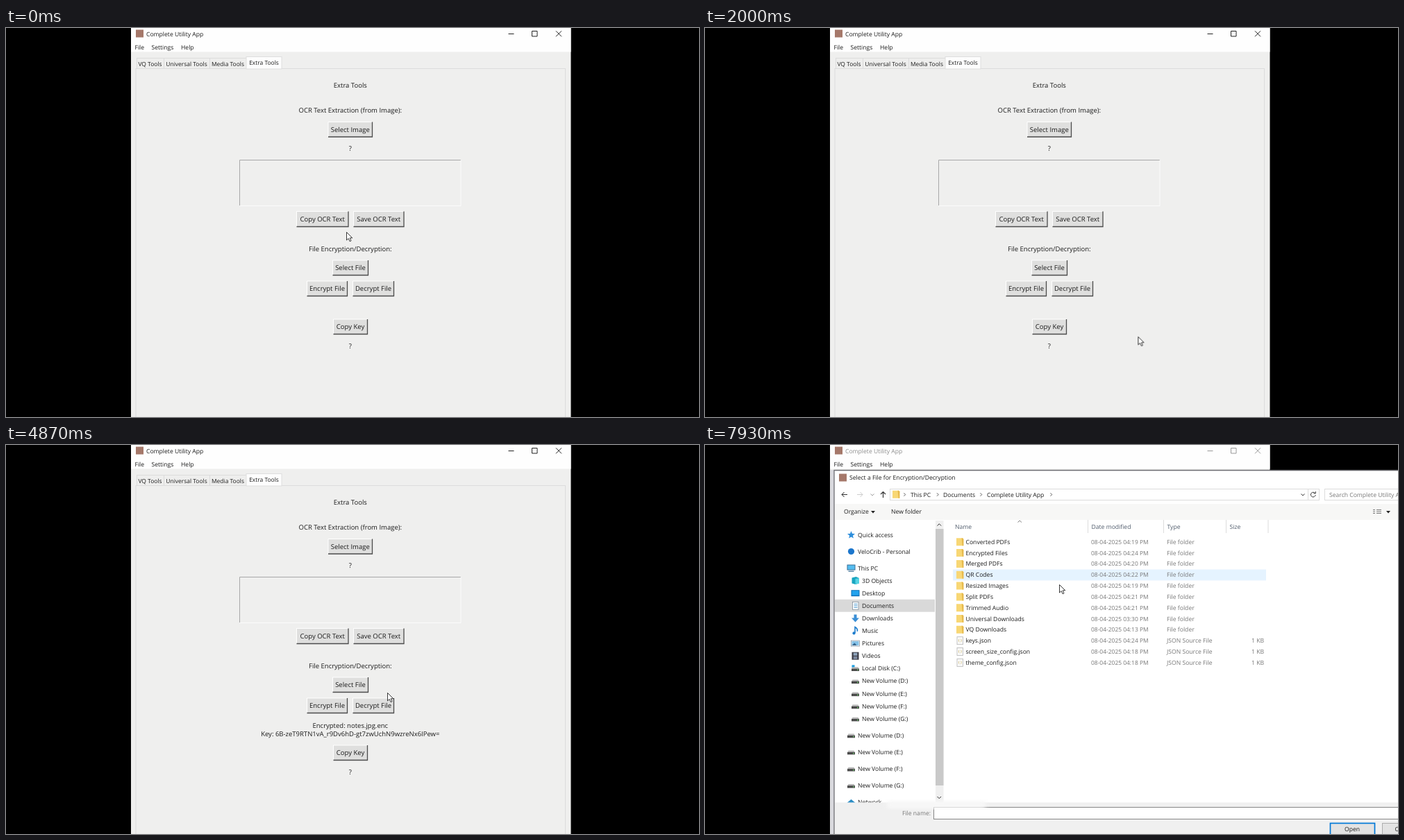
An HTML page for the animation above (8000 ms loop, 998x561 px).

```html
<!DOCTYPE html>
<html lang="en">
<head>
<meta charset="utf-8">
<title>Complete Utility App</title>
<style>
html, body { margin: 0; width: 100%; height: 100%; overflow: hidden; background: #000; }
svg { display: block; width: 100%; height: 100%; }
text { font: 8.6px "Open Sans", "Noto Sans", sans-serif; fill: #1c1c1c; text-rendering: geometricPrecision; white-space: pre; }
.tk { font-size: 9.5px; }
.mid { text-anchor: middle; }
.end { text-anchor: end; }
.tab { font-size: 8.45px; }
.dim { fill: #777; }
.head { fill: #4f5b6b; }
.date { font-size: 8.45px; fill: #777; }
.line { fill: none; stroke: #333; }
.thin { fill: none; stroke: #dcdcdc; }
#dialog { transform-origin: 585px 300px; }
</style>
</head>
<body>
<svg id="stage" viewBox="0 0 998 561" preserveAspectRatio="none"></svg>
<script>
const LOOP = 8000, OPEN_1 = 560, CLOSE_1 = 1640, OPEN_2 = 5930, DOCS = 6500, APP = 7580;
const PICKED = [1000, 5800];

// ---- drawing helpers ----
const rect = (x, y, w, h, fill, extra = '') => `<rect x="${x}" y="${y}" width="${w}" height="${h}" fill="${fill}" ${extra}/>`;
const path = (d, extra = 'class="line"') => `<path d="${d}" ${extra}/>`;
const text = (x, y, s, cls = '') => `<text x="${x}" y="${y}" class="${cls}">${s}</text>`;
const group = (id, ...parts) => `<g id="${id}">${parts.join('')}</g>`;
const at = (x, y, body) => `<g transform="translate(${x} ${y})">${body}</g>`;
const chevron = (x, y, color = '#555') => path(`M${x - 1} ${y - 2.2}l2.2 2.2l-2.2 2.2`, `fill="none" stroke="${color}"`);
const chevronDown = (x, y, color = '#555') => path(`M${x - 2.5} ${y - 1}l2.5 2.4l2.5 -2.4`, `fill="none" stroke="${color}"`);
const triangle = (x, y) => path(`M${x - 3} ${y - 1.5}h6l-3 3.4z`, 'fill="#222"');
const appMark = (x, y) => rect(x, y, 11, 11, '#a5786a');

const button = (x, y, w, h, label) => rect(x, y, w, h, '#dfdfde') +
  path(`M${x} ${y + h}V${y}H${x + w}`, 'fill="none" stroke="#fff"') +
  path(`M${x} ${y + h}H${x + w}V${y}`, 'fill="none" stroke="#4c4c4c" stroke-width="1.3"') +
  text(x + w / 2, y + h / 2 + 3.4, label, 'tk mid');

const icons = {
  star: path('M0 -5.5L1.5 -1.7L5.5 -1.4L2.4 1.2L3.4 5L0 2.9L-3.4 5L-2.4 1.2L-5.5 -1.4L-1.5 -1.7Z', 'fill="#2f8fdc"'),
  dot: '<circle r="4.6" fill="#1b76cc"/>',
  pc: rect(-6, -5, 12, 8, '#3a6f96') + rect(-5, -4, 10, 6, '#55bdf0') + rect(-4, 4, 8, 1.3, '#4a7a9c'),
  cube: path('M-5 -4L1 -5.5L5.5 -3.5V4L0 5.5L-5 4Z', 'fill="#19a5c0"') + path('M0 -2.5L5.5 -3.5V4L0 5.5Z', 'fill="#55d3e3"'),
  desktop: rect(-6, -4.5, 12, 9, '#0b6fb8') + rect(-5, -3.5, 10, 6.5, '#22a3ee'),
  doc: rect(-4, -5.5, 8.5, 11, '#fff', 'stroke="#7f8d99" stroke-width=".8"') + path('M-2 -2.5h5M-2 0h5M-2 2.5h5', 'stroke="#4d9bd0"'),
  down: path('M-2 -5.5H2V-.5H5.5L0 5.5L-5.5 -.5H-2Z', 'fill="#3b8fd6"'),
  music: path('M-.5 3V-5.5Q4 -3 2.6 .8', 'fill="none" stroke="#1d7ccc" stroke-width="1.6"') + '<circle cx="-2" cy="3.4" r="2.1" fill="#1d7ccc"/>',
  picture: rect(-6, -4, 12, 8, '#fff', 'stroke="#8a98a5" stroke-width=".8"') + rect(-5, -3, 10, 6, '#83c1e8') + path('M-5 3L-1 -.5L2 3Z', 'fill="#36648b"'),
  video: rect(-5, -5.5, 10, 11, '#3b3b44') + rect(-2.8, -4.5, 5.6, 4, '#8fa5bd') + rect(-2.8, .6, 5.6, 4, '#7c89a0'),
  disk: path('M-4 -2H4L5.5 .5H-5.5Z', 'fill="#b9b9b9"') + rect(-5.5, .3, 11, 3.4, '#4a4a4a') + rect(2.5, 1.4, 1.6, 1.2, '#6fe06f'),
  system: rect(-5, -5, 4, 4, '#1fa0e0'),
  net: path('M-6 1L0 -4L6 1L0 4Z', 'fill="#2a8cc4"'),
  folder: path('M-5 -5.5H4L5.3 -4V5.5H-5Z', 'fill="#f8d775"') + path('M2.6 -5.5H4L5.3 -4V5.5H3.6Z', 'fill="#e6b94d"'),
  json: rect(-4, -5.5, 8.5, 11, '#fafafa', 'stroke="#b5b5b5" stroke-width=".8"') + path('M-.6 -2q-1.4 0 -1 2q.2 2 1 2M1.2 -2q1.4 0 1 2q-.2 2 -1 2', 'fill="none" stroke="#c7b268" stroke-width=".7"'),
};
icons.system += icons.disk;

const controls = [
  path('M723.5 8.5h8M757.5 4.5h7.5v7.5h-7.5zM792 4.3l8 8m0 -8l-8 8', 'class="line active"'),
].join('');

// ---- application window ----
const tabs = [['VQ Tools', 188, 39], ['Universal Tools', 227, 66], ['Media Tools', 293, 53]];
const CX = 495.8;
const label = (y, s) => text(CX, y + 3.4, s, 'tk mid');
const ocrLines = [[198, 'Clarify'], [224, '=A story in which the underlying meaning, is different from the'],
  [237, 'surface meaning, idem parallels Something of deeper significancy'],
  [249.5, '—&gt;E.g —&gt; Christ’s parable of the sower and the seeds ( for example.']];

const mainWindow = [
  rect(180, 0, 633.5, 561, '#efefee'), rect(180, 0, 633.5, 34.5, '#fefefe'),
  appMark(187, 2.5), text(202, 12, 'Complete Utility App', 'active'), controls,
  text(185.5, 30.7, 'File'), text(209.5, 30.7, 'Settings'), text(252, 30.7, 'Help'),
  rect(187, 58.5, 618.5, 520, 'none', 'class="thin"'),
  ...tabs.map(([s, x, w]) => rect(x + .5, 43.5, w, 15, '#eeeeed', 'stroke="#dcdcdc"') + text(x + w / 2, 54.8, s, 'tab mid')),
  rect(346, 41.5, 51, 17.5, '#fdfdfd', 'stroke="#dedede"'), text(371.5, 53.4, 'Extra Tools', 'tab mid'),
  label(83, 'Extra Tools'), label(119, 'OCR Text Extraction (from Image):'),
  button(464, 135.5, 63.5, 21.5, 'Select Image'), label(174, '?'),
  path('M336.5 256V190.5H655', 'fill="none" stroke="#a8a8a8"'), path('M336.5 256.5H655V190.5', 'fill="none" stroke="#fbfbfb"'),
  group('ocrText', ...ocrLines.map(([y, s]) => text(338, y + 3.4, s, 'tk'))),
  button(418.5, 264.5, 74.5, 22, 'Copy OCR Text'), button(500.5, 264.5, 72.5, 22, 'Save OCR Text'),
  label(319, 'File Encryption/Decryption:'), button(470.5, 335, 51, 21.5, 'Select File'),
  button(433.5, 365, 58, 21.5, 'Encrypt File'), button(499.5, 365, 59, 21.5, 'Decrypt File'),
  group('result', label(404.5, 'Encrypted: notes.jpg.enc'), label(417, 'Key: 6B-zeT9RTN1vA_r9Dv6hD-gt7zwUchN9wzreNx6IPew=')),
  group('keyArea', button(471.5, 420, 49, 21.5, 'Copy Key'), label(459, '?')),
].join('');

// ---- file dialog ----
const tree = [['star', 'Quick access', 129.5], ['dot', 'VeloCrib - Personal', 153.5], ['pc', 'This PC', 177.5],
  ...[['cube', '3D Objects'], ['desktop', 'Desktop'], ['doc', 'Documents'], ['down', 'Downloads'], ['music', 'Music'],
    ['picture', 'Pictures'], ['video', 'Videos'], ['system', 'Local Disk (C:)'],
    ...[...'DEFG'].map(d => ['disk', `New Volume (${d}:)`])].map(([k, s], i) => [k, s, 195.6 + i * 18.1, 6]),
  ...[...'DEFG'].map((d, i) => ['disk', `New Volume (${d}:)`, 418.6 + i * 24.1]), ['net', 'Network', 515]];

const sidebar = '<g clip-path="url(#pane)">' + rect(187, 240.8, 144, 18, '#d9d9d9', 'id="selDownloads"') +
  rect(187, 222.7, 144, 18, '#cce8ff', 'id="selDocuments"') +
  tree.map(([k, s, y, indent = 0]) => at(210.5 + indent, y, icons[k]) + text(220 + indent, y + 3, s)).join('') +
  group('arrows', ...tree.map(([, s, y, indent = 0]) => s === 'This PC' ? chevronDown(194, y) : chevron(194 + indent, y, '#999'))) + '</g>';

const crumbs = (kind, search, list) => at(275, 71.3, icons[kind]) + chevron(287.5, 71.5) +
  list.map(([s, x, next]) => text(x, 74.5, s) + (next ? chevron(next, 71.5) : '')).join('') + text(899, 74.5, search, 'dim');

const rowY = i => 139.8 + i * 15.82;
const row = ([name, date, json], i) => at(367, rowY(i), icons[json ? 'json' : 'folder']) + text(375.5, rowY(i) + 3, name) +
  text(556, rowY(i) + 3, date, 'date') + text(665, rowY(i) + 3, json ? 'JSON Source File' : 'File folder', 'dim') +
  (json ? text(805, rowY(i) + 3, '1 KB', 'dim end') : '');
const listing = (hoverId, rows) => rect(357, 132, 451, 15.8, '#e5f3ff', `id="${hoverId}"`) +
  [['Name', 360], ['Date modified', 556.5], ['Type', 665.5], ['Size', 755.5]].map(([s, x]) => text(x, 121, s, 'head')).join('') +
  path('M551.5 108v19M660.5 108v19M750.5 108v19M811 108v19', 'class="thin"') +
  path('M450.5 111.5l2.7 -2.5l2.7 2.5', 'fill="none" stroke="#777"') + rows.map(row).join('') +
  path('M962 93.5h3M962 96h3M962 98.5h3M967 93.5h7M967 96h7M967 98.5h7', 'stroke="#777"');

const docRows = `9Q Games|27-08-2023 11:59 AM
B5R|17-06-2023 07:10 PM
Tolvi|07-07-2024 09:05 PM
Brenkosoft|07-04-2023 05:58 PM
Arduino|08-04-2023 02:58 PM
Wanderer's Vow III Grey Harbor|02-06-2024 10:55 AM
Path of Umbel|23-03-2023 12:53 PM
TRELVO|23-03-2023 12:53 PM
Complete Utility App|08-04-2025 04:24 PM
Halvander Games|16-02-2025 06:35 PM
Custom Office Templates|05-08-2023 09:32 PM
FadingMoss|14-05-2023 04:05 PM
QO Games|08-07-2024 09:09 PM
Velmu|21-11-2024 10:23 PM
Fax|24-09-2023 12:19 PM
RKV Port Velmora User Files|13-04-2024 12:30 PM
RKV Elm Dale User Files|07-04-2023 10:19 PM
RKV3 User Files|07-04-2023 07:30 PM
lost folder|13-07-2024 05:02 PM
hollowfern_game|07-04-2025 10:44 PM
TRBX|15-04-2023 09:40 PM
My Cheat Tables|28-12-2024 11:50 AM
My Games|11-01-2025 08:41 PM
Thirst for Drift Blaze|22-03-2023 03:55 PM`.split('\n').map(s => s.split('|'));
const appRows = `Converted PDFs|04:19|
Encrypted Files|04:24|
Merged PDFs|04:20|
QR Codes|04:22|
Resized Images|04:19|
Split PDFs|04:21|
Trimmed Audio|04:21|
Universal Downloads|03:30|
VQ Downloads|04:13|
keys.json|04:24|json
screen_size_config.json|04:18|json
theme_config.json|04:18|json`.split('\n').map(s => s.split('|')).map(([n, t, j]) => [n, `08-04-2025 ${t} PM`, j]);

// A sheet of handwritten notes, simplified.
const sheet = rect(370.5, 115.5, 51, 69, '#aaa39c') + path('M373 117H420L418.5 183H371.5Z', 'fill="#dedbd8"') +
  path('M383 119.5h28', 'stroke="#555" stroke-width="1.6"') +
  [124, 133, 143, 153, 168].map(y => path(`M376 ${y}h9`, 'stroke="#444" stroke-width="1.3"') +
    path(`M377 ${y + 3}h37M377 ${y + 5.5}h34`, 'stroke="#aaa5a2" stroke-width=".8"')).join('');

const dialog = [
  rect(180.5, 36, 6, 530, '#8c8ca8', 'opacity=".22"'),
  rect(186, 36, 840, 540, '#fff'), path('M186 570V36.5H1020', 'fill="none" stroke="#6d6d72" stroke-width="1.3"'),
  appMark(193, 41.5), text(208, 50, 'Select a File for Encryption/Decryption'),
  path('M205 71.5h-8m3.5 -3.5l-3.5 3.5l3.5 3.5', 'fill="none" stroke="#ccc"'),
  group('back', path('M205 71.5h-8m3.5 -3.5l-3.5 3.5l3.5 3.5')),
  path('M219 71.5h8m-3.5 -3.5l3.5 3.5l-3.5 3.5', 'fill="none" stroke="#ccc"'), chevronDown(241, 71.5, '#999'),
  path('M256.5 76v-8.5m-3.5 3.5l3.5 -3.5l3.5 3.5', 'class="line" stroke-width="1.2"'),
  rect(266.5, 63.5, 618, 16, 'none', 'class="thin"'), rect(892.5, 63.5, 130, 16, 'none', 'class="thin"'),
  chevronDown(861, 71.5, '#333'), path('M868.5 64v15', 'class="thin"'),
  path('M878.5 69.5a3.4 3.4 0 1 0 .7 2.5M879.3 67v2.8h-2.8'),
  rect(187, 85, 830, 23, '#f7f7f6'), text(200, 99.4, 'Organize'), triangle(242, 96.5), text(268, 99.4, 'New folder'), triangle(984, 96.5),
  sidebar,
  rect(332, 109, 11.5, 406, '#f0f0f0'), rect(332, 121, 11.5, 370, '#c9c9c9'),
  path('M334.5 116.5l2.8 -2.8l2.8 2.8M334.5 507l2.8 2.8l2.8 -2.8'),
  group('ocr', crumbs('folder', 'Search OCR', [['This PC', 296, 335], ['Downloads', 343, 397.5], ['Test', 405, 428.5], ['OCR', 437]]),
    rect(357.5, 113, 78.5, 79, '#d9d9d9', 'id="picked"'), sheet, text(397, 195.5, 'notes.jpg', 'mid'),
    rect(962.5, 92.5, 10, 7, '#e8f1f8', 'stroke="#66829a"') + rect(964, 94, 4, 4, '#2d83c5'),
    rect(336, 194, 172, 61, 'url(#veil)', 'id="cover" filter="url(#soft)"')),
  group('docs', crumbs('doc', 'Search Documents', [['This PC', 296, 335], ['Documents', 343, 397.5]]), listing('docHover', docRows),
    group('tip', rect(530, 243, 146, 38, '#777', 'opacity=".4"'), rect(528, 241.5, 146, 37, '#fff', 'stroke="#8c8c8c"'),
      text(532, 251.5, 'Date created: 23-03-2023 12:53 PM', 'dim'), text(532, 262.8, 'Size: 112 KB', 'dim'), text(532, 274, 'Folders: players', 'dim'))),
  group('app', crumbs('folder', 'Search Complete Utility App', [['This PC', 296, 335], ['Documents', 343, 397.5], ['Complete Utility App', 406, 498.5]]),
    listing('appHover', appRows)),
  rect(187, 515.5, 830, 60, '#f0f0f0'),
  text(325, 534, 'File name:', 'end dim'), rect(329.5, 522.5, 700, 17, '#fff', 'stroke="#868686"'),
  group('focus', rect(330, 522.5, 700, 16.5, 'none', 'stroke="#0078d7" stroke-width="1.2"'), path('M333.5 526v10')),
  group('fileName', text(332, 534.5, 'notes.jpg')),
  rect(262, 513, 142, 11.5, '#f8f8f8', 'filter="url(#soft)"'),
  rect(900.5, 545.5, 64, 18, '#e3e3e3', 'stroke="#0078d7" stroke-width="1.7"'),
  group('openHover', rect(900.5, 545.5, 64, 18, '#cfe6f7', 'stroke="#2d7db5" stroke-width="1.2"')),
  text(932, 556.5, 'Open', 'mid'), rect(975.5, 545.5, 64, 18, '#e3e3e3', 'stroke="#adadad"'), text(993.5, 556.5, 'Cancel'),
];

const pointer = path('M.5 .5V12L3.2 9.5L5.1 13.7L7 12.9L5.2 8.8H8.8Z', 'fill="#fff" stroke="#222" stroke-width=".9"');

document.getElementById('stage').innerHTML = `<defs>
  <clipPath id="pane"><rect x="187" y="109" width="145" height="406.5"/></clipPath>
  <filter id="soft"><feGaussianBlur stdDeviation="3"/></filter>
  <linearGradient id="veil"><stop offset=".55" stop-color="#fdfdfb"/><stop offset="1" stop-color="#fdfdfb" stop-opacity="0"/></linearGradient>
  </defs>` + mainWindow + group('dialog', ...dialog) + group('cursor', pointer);

// ---- motion: keyframes written in milliseconds ----
let css = '';
function motion(selector, stops, easing = 'linear') {
  const name = 'm' + css.length;
  const all = [...stops, [LOOP, stops[stops.length - 1][1]]];
  css += `@keyframes ${name}{${all.map(([t, rule]) => `${t / LOOP * 100}%{${rule}}`).join('')}}
${selector}{animation:${name} ${LOOP}ms ${easing} infinite}`;
}
const steps = (selector, stops) => motion(selector, stops, 'step-end');
function show(selector, ...ranges) {
  const stops = ranges.flatMap(([a, b]) => [[a, 'opacity:1'], ...(b < LOOP ? [[b, 'opacity:0']] : [])]);
  steps(selector, ranges[0][0] ? [[0, 'opacity:0'], ...stops] : stops);
}

show('#result', [2600, LOOP]);
steps('#keyArea', [[0, 'transform:none'], [2600, 'transform:translateY(13px)']]);
show('#ocrText', [OPEN_2 - 40, LOOP]);
const inactive = [[0, 0], [OPEN_1, 1], [CLOSE_1, 0], [OPEN_2, 1]];
steps('text.active', inactive.map(([t, off]) => [t, `fill:${off ? '#8d8d8d' : '#1c1c1c'}`]));
steps('path.active', inactive.map(([t, off]) => [t, `stroke:${off ? '#999' : '#222'}`]));

const pose = (opacity, scale) => `opacity:${opacity};transform:scale(${scale})`;
const appear = t => [[t, pose(0, .96)], [t + 140, pose(.92, .995)], [t + 190, pose(1, 1)]];
motion('#dialog', [[0, pose(0, .96)], ...appear(OPEN_1), [CLOSE_1, pose(1, 1)], [CLOSE_1 + 80, pose(0, .97)], ...appear(OPEN_2)]);

show('#ocr', [0, DOCS]);
show('#docs', [DOCS, APP]);
show('#app', [APP, LOOP]);
show('#back', [DOCS, LOOP]);
show('#selDownloads', [0, DOCS]);
steps('#selDocuments', [[0, 'opacity:0'], [DOCS, 'opacity:1;fill:#cce8ff'], [APP, 'opacity:1;fill:#d9d9d9']]);
show('#arrows', [6300, 7650]);
show('#picked', PICKED);
show('#fileName', PICKED);
show('#focus', [0, PICKED[0]], [PICKED[1], DOCS]);
show('#openHover', [1420, PICKED[1]]);
show('#cover', [0, PICKED[1]]);
motion('#tip', [[0, 'opacity:0'], [7100, 'opacity:0'], [7200, 'opacity:.78'], [7260, 'opacity:1'], [7480, 'opacity:1'], [7560, 'opacity:0']]);

const hover = list => list.map(([t, i]) => [t, i < 0 ? 'opacity:0' : `opacity:1;transform:translateY(${i * 15.82}px)`]);
steps('#docHover', hover([[0, -1], [6900, 6], [7000, 7], [7340, 8]]));
steps('#appHover', hover([[0, -1], [APP, 8], [7730, 6], [7800, 4], [7860, 3]]));

const route = [[0, 490, 294], [250, 496, 347], [600, 496, 347], [950, 398, 155], [1060, 398, 155], [1450, 929, 553], [1610, 929, 553],
  [1730, 810, 522], [2250, 462, 378], [2650, 462, 378], [3070, 462, 420], [3500, 496, 445], [4250, 496, 445], [4870, 549, 357],
  [5300, 497, 347], [5750, 497, 347], [6070, 406, 221], [6350, 250, 232], [6600, 250, 232], [7170, 531, 253], [7230, 531, 253],
  [7420, 480, 267], [7600, 480, 267], [7920, 510, 201]];
motion('#cursor', route.map(([t, x, y]) => [t, `transform:translate(${x}px,${y}px)`]), 'ease-in-out');

const style = document.createElement('style');
style.textContent = css;
document.head.append(style);
</script>
</body>
</html>
```
